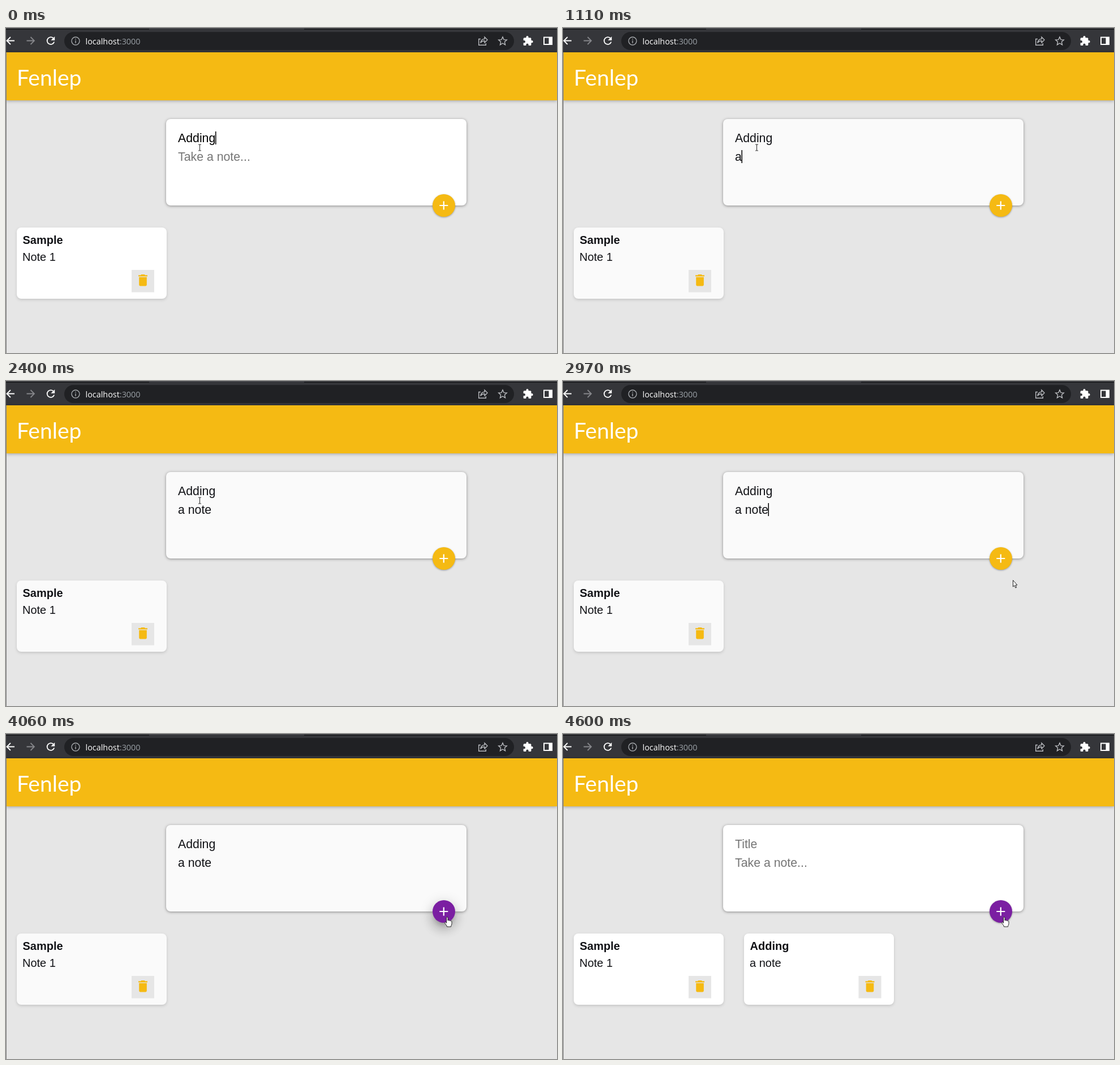
These frames come from a looping animation (974x575 px, 5.58 s). An HTML page:

```html
<!DOCTYPE html>
<html lang="en">
<head>
<meta charset="utf-8">
<title>Notes</title>
<style>
  html, body { margin: 0; width: 100%; height: 100%; overflow: hidden; background: #e6e6e6; }
  #stage { position: relative; width: 974px; height: 575px; overflow: hidden; background: #e6e6e6; --paper: #fff; }
  #stage > * { position: absolute; box-sizing: border-box; }
  .browser { left: 0; top: 0; width: 974px; height: 43px; background: #35363a; }
  .header { left: 0; top: 43px; width: 974px; height: 85px; background: #f5ba13; box-shadow: 0 1px 6px rgba(0, 0, 0, .32); }
  .form { left: 283px; top: 161px; width: 531px; height: 153px; border-radius: 8px; background: var(--paper); box-shadow: 0 1px 5px #8a8989; }
  .card { left: 19px; top: 353px; width: 265px; height: 126px; border-radius: 8px; background: var(--paper); box-shadow: 0 2px 5px #c4c4c4; }
  .second { left: 319.5px; }
  #fab { left: 754px; top: 294px; width: 40px; height: 40px; border-radius: 50%; overflow: hidden; }
  #ripple { position: absolute; left: 1px; top: 3px; width: 50px; height: 50px; border-radius: 50%; background: #fff; }
  svg { left: 0; top: 0; }
  .url { font: 14.4px "Open Sans", "Noto Sans", sans-serif; }
  .brand { font: 39px Lato, sans-serif; fill: #fff; }
  .field { font: 21.3px "Liberation Sans", Arial, sans-serif; }
  .body, .title { font: 20px "Liberation Sans", Arial, sans-serif; fill: #111216; }
  .title { font-weight: bold; }
  .line { fill: none; stroke: #fff; stroke-width: 1.8; }
</style>
</head>
<body>
<div id="stage">
  <div class="browser"></div>
  <div class="header"></div>
  <div class="form"></div>
  <div class="card"></div>
  <div class="card second added"></div>
  <div id="fab"><div id="ripple"></div></div>

  <svg width="974" height="575" viewBox="0 0 974 575">
    <defs>
      <g id="trash">
        <path fill="#e6e6e6" d="M222 428h40v39.5h-40z"/>
        <path fill="#f5ba13" transform="translate(228.4 432.7) scale(1.135)"
          d="M6 19c0 1.1.9 2 2 2h8c1.1 0 2-.9 2-2V7H6zM19 4h-3.5l-1-1h-5l-1 1H5v2h14z"/>
      </g>
    </defs>

    <path fill="#1d1e21" d="M0 0H253V3H0zM527 0H974V3H527z"/>
    <path fill="#55565a" d="M0 0H974V1H0z"/>
    <path fill="#808080" d="M0 43H1V575H0z"/>
    <rect x="103" y="7" width="795" height="32" rx="16" fill="#202124"/>

    <path class="line" d="M15 22.5H2M8 16L1.5 22.5 8 29"/>
    <path class="line" style="stroke:#85868a" d="M36.5 22.5H50M43.5 16L50 22.5 43.5 29"/>
    <path class="line" stroke-width="2" d="M84.2 18.6A6.4 6.4 0 1 0 85.2 24.5"/>
    <path fill="#fff" d="M86.2 15V21.8H79.4z"/>
    <g fill="none" stroke="#a5a8ac" stroke-width="1.4">
      <circle cx="123" cy="23" r="7"/>
      <path d="M123 22V27M123 18.8V20.4"/>
    </g>
    <g fill="none" stroke="#b9bbbf" stroke-width="1.4">
      <path d="M839 19.5H835.7V30.3H848.3V27"/>
      <path d="M838.8 26.5C839.5 21.5 842.5 19.5 846 19.4V16L851 21 846 26V22.8C843 22.7 840.5 23.8 838.8 26.5z"/>
      <path d="M878 15.8L880.1 20.6 885.3 21.1 881.4 24.6 882.5 29.7 878 27 873.5 29.7 874.6 24.6 870.7 21.1 875.9 20.6z"/>
    </g>
    <path fill="#fff" transform="translate(913 13.2) scale(.81)"
      d="M20.5 11H19V7c0-1.1-.9-2-2-2h-4V3.5a2.5 2.5 0 0 0-5 0V5H4c-1.1 0-2 .9-2 2v3.8h1.500a2.700 2.700 0 0 1 0 5.400H2V20c0 1.100.9 2 2 2h3.800v-1.500a2.700 2.700 0 0 1 5.400 0V22H17c1.100 0 2-.9 2-2v-4h1.500a2.500 2.500 0 0 0 0-5z"/>
    <path fill="#fff" fill-rule="evenodd" d="M950 15.500H966V30H950zM952 17.500V28H959.500V17.500z"/>

    <text class="url" x="140.500" y="28.500" fill="#fff">localhost<tspan fill="#9aa0a6">:3000</tspan></text>
    <text class="brand" x="19" y="102">Fenlep</text>

    <text class="field" id="title" x="304" y="202"></text>
    <text class="field" id="note" x="304" y="235"></text>
    <rect id="caret" width="1.500" height="23" fill="#000"/>
    <path d="M766.300 314H781.300M773.800 306.500V321.500" stroke="#fff" stroke-width="2.200"/>

    <text class="title" x="29.500" y="382">Sample</text>
    <text class="body" x="29" y="411.500">Note 1</text>
    <use href="#trash"/>
    <g class="added">
      <text class="title" x="330.500" y="382">Adding</text>
      <text class="body" x="330" y="411.500">a note</text>
      <use href="#trash" x="300.500"/>
    </g>

    <g id="pointer">
      <path id="beam" fill="none" stroke="#333" stroke-width="1.100" d="M-2.500 -5H-.8L0 -4.500 .8 -5H2.500M0 -4.500V5.500M-2.500 6H-.8L0 5.500 .8 6H2.500"/>
      <path id="arrow" fill="#fff" stroke="#222" d="M.5 .5V12L3 9.700 4.900 14 6.700 13.200 4.800 9H8z"/>
      <path id="hand" fill="#fff" stroke="#222" stroke-linejoin="round"
        d="M-1.500 1C-1.500 -.5 1 -.5 1 1V6C1.500 5 3.300 5.200 3.400 6.300 4 5.400 5.700 5.800 5.800 7 6.500 6.300 8 6.700 8 8V11.500C8 14 6.500 14.500 6.500 17H-.5C-.5 14.500 -3 13 -4.300 10.300 -5 8.800 -3.300 8 -2.500 9.300L-1.500 10.500z"/>
    </g>
  </svg>
</div>

<script>
const LOOP = 5580;
const YELLOW = '#f5ba13', PURPLE = '#7b1fa2';
const LEFT = 304;
const $ = id => document.getElementById(id);

// Each entry lists only what changes; earlier values carry over.
const changes = [
  [0, { title: 'Adding', note: '', caret: 370, row: 183, paper: '#fff', ink: '#000',
        cursor: 'beam', at: [342.5, 211], fab: YELLOW, lift: 0, ripple: 0, added: false }],
  [150, { caret: LEFT, row: 216, paper: '#fafafa', ink: '#111216' }],
  [710, { caret: null }],
  [1110, { note: 'a', caret: 315.5 }],
  [1260, { note: 'a ', caret: 321.5 }],
  [1660, { note: 'a n', caret: 333 }],
  [1780, { note: 'a not', caret: 351 }],
  [1900, { note: 'a note', caret: 362.5 }],
  [2400, { caret: null }],
  [2550, { cursor: 'arrow', at: [640, 335] }],
  [2700, { at: [800, 390] }],
  [2850, { at: [808, 420] }],
  [2970, { at: [795, 352], caret: 362.5 }],
  [3120, { at: [789, 342] }],
  [3240, { at: [786, 336] }],
  [3390, { cursor: 'hand', at: [780, 324], fab: '#b86d5b' }],
  [3510, { fab: PURPLE, caret: null }],
  [3940, { lift: .5 }],
  [4060, { lift: 1 }],
  [4210, { title: '', note: '', paper: '#fff', lift: 0, ripple: .2, added: true }],
  [4360, { ripple: .12 }],
  [4480, { ripple: .05 }],
  [4600, { ripple: 0 }]
];

let carried = {};
const states = changes.map(([time, change]) => {
  carried = { ...carried, ...change };
  return { time, ...carried };
});

function setField(id, text, placeholder, ink) {
  $(id).textContent = text || placeholder;
  $(id).style.fill = text ? ink : '#757575';
}

function fabShadow(lift) {
  const soft = `0 1px 3px rgba(0,0,0,${.34 * (1 - lift)})`;
  const raised = `0 7px 8px -4px rgba(0,0,0,${.2 * lift}), 0 12px 17px 2px rgba(0,0,0,${.14 * lift}), 0 5px 22px 4px rgba(0,0,0,${.12 * lift})`;
  return `${soft}, ${raised}`;
}

function render(s) {
  $('stage').style.setProperty('--paper', s.paper);
  setField('title', s.title, 'Title', s.ink);
  setField('note', s.note, 'Take a note...', s.ink);

  $('caret').style.display = s.caret === null ? 'none' : '';
  $('caret').setAttribute('x', s.caret ?? LEFT);
  $('caret').setAttribute('y', s.row);

  for (const id of ['beam', 'arrow', 'hand']) $(id).style.display = id === s.cursor ? '' : 'none';
  $('pointer').setAttribute('transform', `translate(${s.at})`);

  $('fab').style.background = s.fab;
  $('fab').style.boxShadow = fabShadow(s.lift);
  $('ripple').style.opacity = s.ripple;
  for (const el of document.querySelectorAll('.added')) el.style.display = s.added ? '' : 'none';
}

const start = performance.now();
let shown;
function tick() {
  const t = (performance.now() - start) % LOOP;
  const state = states.findLast(s => s.time <= t);
  if (state !== shown) render(shown = state);
  requestAnimationFrame(tick);
}
tick();
</script>
</body>
</html>
```
